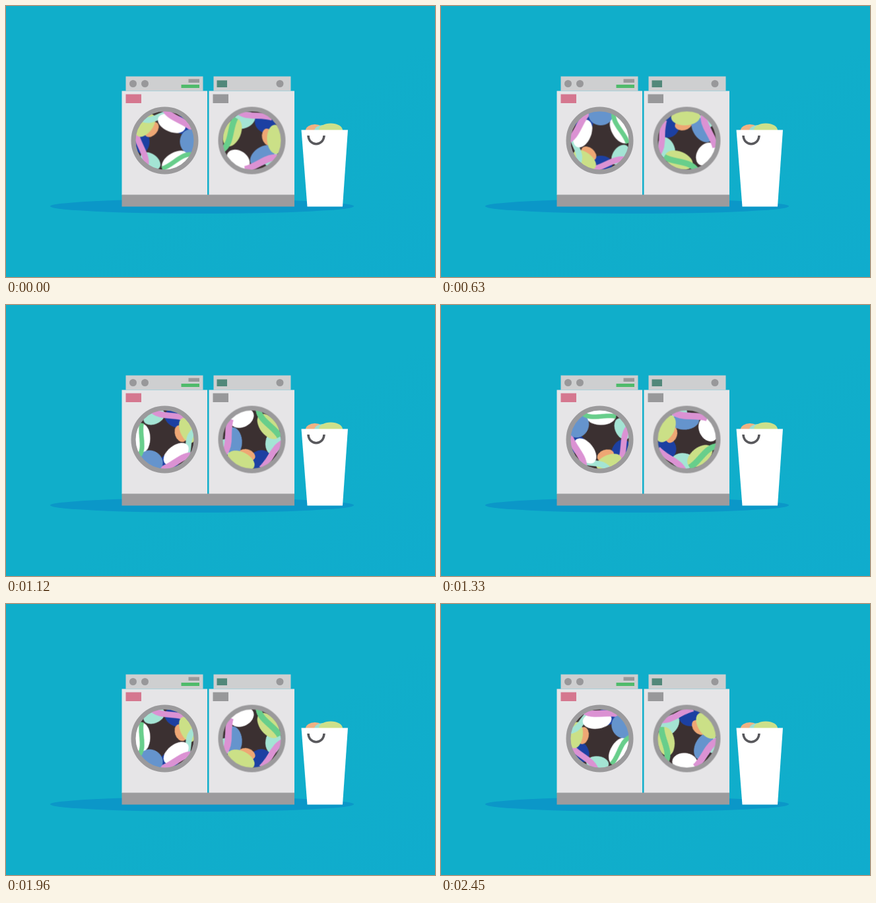
These frames come from a looping animation (650x410 px, 2.52 s). An HTML page:

```html
<!DOCTYPE html>
<html lang="en">
<head>
<meta charset="utf-8">
<title>Laundry</title>
<style>
  html, body { margin: 0; width: 100%; height: 100%; overflow: hidden; background: #10aeca; }
  svg { display: block; width: 650px; height: 410px; }
</style>
</head>
<body>
<svg viewBox="0 0 650 410">
  <defs>
    <linearGradient id="bg" x1="0" y1="0" x2="1" y2="1">
      <stop offset=".55" stop-color="#10aeca"/>
      <stop offset="1" stop-color="#10accd"/>
    </linearGradient>
    <clipPath id="glass"><circle r="46"/></clipPath>
  </defs>
  <rect width="650" height="410" fill="url(#bg)"/>
  <ellipse cx="297" cy="303" rx="230" ry="11" fill="#0b97c8"/>

  <g fill="#cecfd0">
    <rect x="181.500" y="106.500" width="117" height="22"/>
    <rect x="314.500" y="106.500" width="117" height="22"/>
  </g>
  <g fill="#e6e5e7">
    <rect x="175.500" y="128.500" width="129.500" height="157.500"/>
    <rect x="307.500" y="128.500" width="129.500" height="157.500"/>
  </g>
  <rect x="175.500" y="285.500" width="261.500" height="18" fill="#9c9b9d"/>
  <g fill="#98989a">
    <circle cx="192.500" cy="117.500" r="5.500"/>
    <circle cx="210.500" cy="117.500" r="5.500"/>
    <circle cx="415" cy="117.500" r="5.500"/>
    <rect x="276.500" y="110.500" width="16.500" height="5.500"/>
    <rect x="313.500" y="133.500" width="23.500" height="13.500"/>
  </g>
  <rect x="265.500" y="119" width="27.500" height="5" fill="#50bb6b"/>
  <rect x="181.500" y="133.500" width="23.500" height="13.500" fill="#d5778f"/>
  <rect x="319.500" y="112.500" width="15.500" height="10.500" fill="#52887a"/>

  <g id="drums"></g>

  <ellipse cx="468" cy="188" rx="14" ry="9" fill="#f0b283"/>
  <ellipse cx="480" cy="189" rx="13" ry="9" fill="#9fe0cf"/>
  <ellipse cx="492" cy="188" rx="18" ry="10.500" fill="#cde08a"/>
  <path d="M447.500 187.500H518L510 303.500H456.500Z" fill="#fff"/>
  <path d="M458 196C459 213 481 213 482 196" fill="none" stroke="#58585c" stroke-width="3.600"/>
</svg>
<script>
  const NS = 'http://www.w3.org/2000/svg';
  const color = {
    lime: '#cbe087', mint: '#a4e4d4', blue: '#6594cd', navy: '#1c40a2',
    orange: '#eea774', pink: '#db92d3', green: '#68ce8b', white: '#fff'
  };

  function add(parent, tag, attrs) {
    const el = document.createElementNS(NS, tag);
    for (const key in attrs) el.setAttribute(key, attrs[key]);
    return parent.appendChild(el);
  }

  // Clothes are placed around the drum by angle and distance from its axis.
  const blob = (name, angle, r, depth, span) => g => add(g, 'ellipse', {
    cx: r, rx: depth, ry: span, fill: color[name], transform: `rotate(${angle})`
  });
  const band = (name, angle, r, span, width) => g => add(g, 'path', {
    d: `M${r + 8} ${-span}C${r - 6} ${-span / 2} ${r + 5} ${span / 3} ${r} ${span}`,
    fill: 'none', stroke: color[name], 'stroke-width': width, transform: `rotate(${angle})`
  });

  const loads = [
    { x: 240.5, clothes: [
      blob('navy', 318, 35, 13, 14),
      blob('navy', 178, 36, 13, 18),
      blob('mint', 125, 38, 11, 17),
      band('pink', 158, 36, 28, 9),
      blob('orange', 220, 26, 9, 13),
      blob('lime', 218, 37, 11, 20),
      band('mint', 250, 36, 22, 9),
      blob('white', 292, 28, 13, 22),
      band('pink', 300, 37, 28, 10),
      blob('white', 62, 36, 14, 23),
      blob('blue', 2, 38, 15, 18),
      band('green', 58, 34, 26, 7)
    ] },
    { x: 372.5, clothes: [
      blob('navy', 308, 33, 14, 17),
      blob('orange', 348, 25, 9, 13),
      band('mint', 30, 38, 22, 10),
      blob('mint', 248, 33, 12, 18),
      blob('blue', 55, 28, 13, 21),
      blob('lime', 202, 32, 13, 22),
      blob('lime', 357, 36, 13, 22),
      blob('white', 125, 36, 14, 19),
      band('pink', 275, 37, 28, 9),
      band('pink', 65, 35, 28, 10),
      band('green', 195, 33, 27, 9)
    ] }
  ];

  for (const { x, clothes } of loads) {
    const drum = add(document.getElementById('drums'), 'g', { transform: `translate(${x} 203.5)` });
    add(drum, 'circle', { r: 47, fill: '#3b3031' });
    const spin = add(add(drum, 'g', { 'clip-path': 'url(#glass)' }), 'g', {});
    clothes.forEach(draw => draw(spin));
    add(drum, 'circle', { r: 47.5, fill: 'none', stroke: '#9b9a9c', 'stroke-width': 7 });
    spin.style.transformOrigin = '0 0';
    spin.animate(
      [{ transform: 'rotate(0deg)' }, { transform: 'rotate(360deg)' }],
      { duration: 840, iterations: Infinity, easing: 'steps(12, end)' }
    );
  }
</script>
</body>
</html>
```
